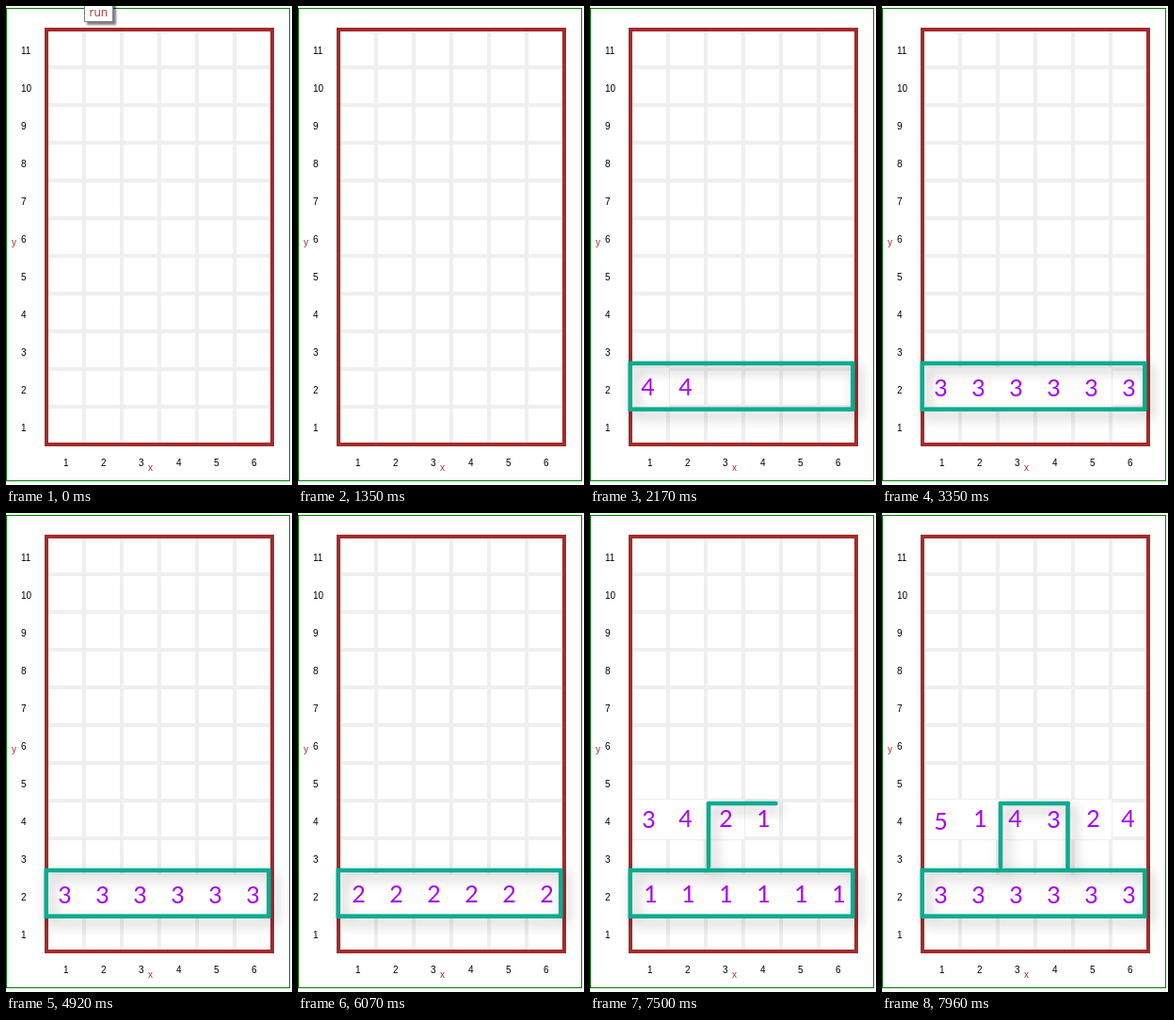
An HTML page for the animation above (8000 ms loop, 304 by 508 pixels).

```html
<!DOCTYPE html>
<html lang="en">
<head>
<meta charset="utf-8">
<title>Grid fill</title>
<style>
  html, body { margin: 0; width: 100%; height: 100%; overflow: hidden; background: #fff; }
  svg { display: block; }
  .label { font: 10px "Liberation Sans", Arial, sans-serif; }
  .digit { font: 25px Lato, sans-serif; fill: #a800f0; text-anchor: middle; }
  .mark { fill: none; stroke: #0bac90; stroke-width: 4.6; stroke-linecap: round; }
  .shadow { filter: drop-shadow(5px 6px 7px rgba(0, 0, 0, .3)); }
  #run { filter: drop-shadow(3px 3px 1px rgba(0, 0, 0, .5)); }
  #run text { font: 12px "Open Sans", sans-serif; fill: #a52a2a; }
</style>
</head>
<body>
<svg id="stage" width="304" height="508">
  <rect x=".5" y="2.5" width="301" height="501" fill="none" stroke="#008000"/>
  <g id="grid" stroke="#efefef" stroke-width="4"></g>
  <g id="cells"></g>
  <rect x="43" y="25" width="240" height="440" fill="none" stroke="#a52a2a" stroke-width="4"/>
  <g id="labels" class="label">
    <text x="6" y="254" fill="#a52a2a">y</text>
    <text x="151" y="493" fill="#a52a2a">x</text>
  </g>
  <g class="shadow">
    <path id="left" class="mark" d="M126 308V375"/>
    <path id="top" class="mark" d="M126 308H197.5"/>
    <path id="right" class="mark" d="M197.5 308V376"/>
  </g>
  <g id="box" class="shadow"><rect class="mark" x="42.7" y="379" width="236.6" height="48.7"/></g>
  <g id="digits"></g>
  <g id="run">
    <rect x="83.5" y="-5.5" width="30" height="22" fill="#fff" stroke="#7c7c98"/>
    <text x="88.5" y="11">run</text>
  </g>
</svg>
<script>
const LOOP = 8000, COLS = 6, ROWS = 11, STEP = 40;
const TICKS = [1530, 2170, 2500, 2750, 3070, 3350, 3670, 4000, 4280, 4570, 4920,
  5210, 5500, 5820, 6070, 6420, 6710, 7000, 7320, 7600, 7960];
const UPPER_START = 15;               // tick at which the upper row begins
const UPPER_SEEDS = [5, 2, 1, 1, 1, 4]; // first value in each upper column
// Centre and baseline of each digit 1..5 inside the first cell
const DIGIT_X = [64.5, 64.5, 62.5, 61.5, 62.5];
const DIGIT_Y = [413, 413, 413.5, 413, 415.5];

const $ = id => document.getElementById(id);
function add(parent, tag, attrs, text = "") {
  const el = document.createElementNS("http://www.w3.org/2000/svg", tag);
  for (const key in attrs) el.setAttribute(key, attrs[key]);
  el.textContent = text;
  return parent.appendChild(el);
}

for (let i = 1; i < ROWS; i++) add($("grid"), "path", { d: `M45 ${25 + STEP * i}H281` });
for (let i = 1; i < COLS; i++) add($("grid"), "path", { d: `M${43 + STEP * i} 27V463` });
for (let i = 0; i < ROWS; i++) add($("labels"), "text", { x: 16, y: 51 + STEP * i }, ROWS - i);
for (let i = 0; i < COLS; i++) add($("labels"), "text", { x: 61 + STEP * i, y: 488 }, i + 1);

function makeRow(dy) {
  const cover = add($("cells"), "rect", { x: 45, y: 384 + dy, height: 42, fill: "#fff" });
  const digits = Array.from({ length: COLS }, () => add($("digits"), "text", { class: "digit" }));
  return (count, valueAt) => {
    const edge = count < 2 ? 70 : Math.min(281, 4 + STEP * count);
    cover.setAttribute("width", count > 0 ? edge - 45 : 0);
    digits.forEach((el, i) => {
      if (i >= count) { el.textContent = ""; return; }
      const n = valueAt(i) % 5;
      el.textContent = n + 1;
      el.setAttribute("x", DIGIT_X[n] + STEP * i);
      el.setAttribute("y", DIGIT_Y[n] + dy);
    });
  };
}
const lowerRow = makeRow(0), upperRow = makeRow(-80);

const ramp = (t, a, b) => Math.min(1, Math.max(0, (t - a) / (b - a)));
const fade = (id, opacity) => $(id).setAttribute("opacity", opacity);

function draw(t) {
  const tick = TICKS.filter(at => at <= t).length - 1;
  lowerRow(tick + 1, () => tick + 2);
  const upper = tick - UPPER_START;
  upperRow(upper + 1, i => UPPER_SEEDS[i] - 1 + upper - i);
  fade("run", 1 - ramp(t, 1090, 1350));
  fade("box", ramp(t, 1640, 2030));
  fade("left", ramp(t, 6690, 7000));
  fade("top", ramp(t, 7130, 7480));
  fade("right", ramp(t, 7500, 7780));
}

const start = performance.now();
function frame() {
  draw((performance.now() - start) % LOOP);
  requestAnimationFrame(frame);
}
frame();
</script>
</body>
</html>
```
